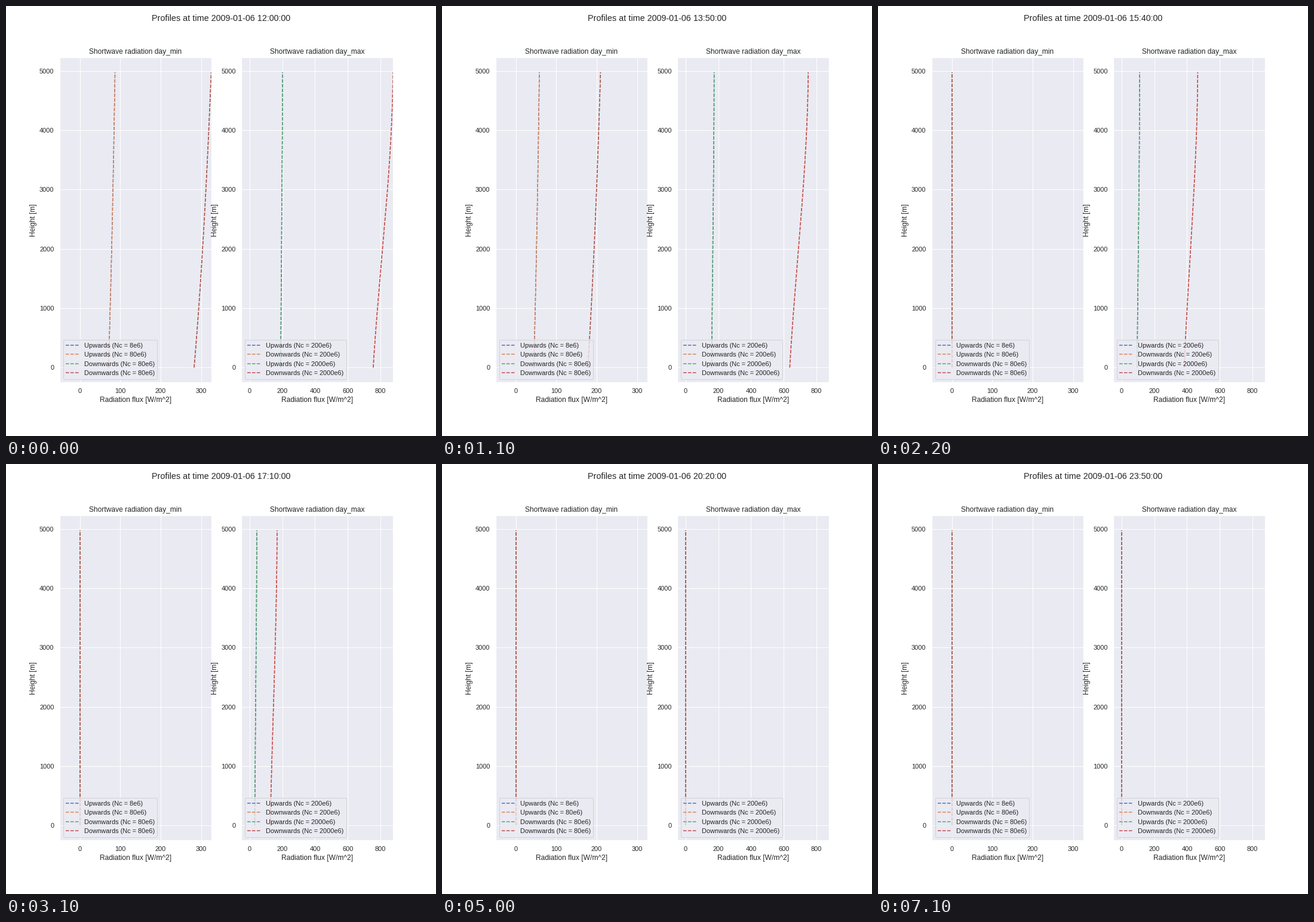
Recreate the animation shown at these times as a matplotlib script. Size 720 px wide and 720 px high, loop 7200 ms.

```python
import numpy as np
import matplotlib.pyplot as plt
from matplotlib.animation import FuncAnimation

FRAMES = 72
STEP_MS = 100
BLUE, ORANGE, GREEN, RED = "#4C72B0", "#DD8452", "#55A868", "#C44E52"

plt.rcParams.update({
    "font.family": "Liberation Sans", "font.size": 12,
    "text.color": ".15", "axes.labelcolor": ".15",
    "axes.facecolor": "#EAEAF2", "axes.edgecolor": "white",
    "axes.linewidth": 1.25, "axes.grid": True, "axes.axisbelow": True,
    "axes.labelsize": 12, "axes.titlesize": 12,
    "grid.color": "white", "grid.linewidth": 1,
    "xtick.color": ".15", "ytick.color": ".15",
    "xtick.labelsize": 11, "ytick.labelsize": 11,
    "xtick.major.size": 6, "ytick.major.size": 6,
    "xtick.bottom": False, "ytick.left": False,
    "lines.linewidth": 1.5, "patch.linewidth": 1,
    "legend.fontsize": 11, "figure.subplot.bottom": 0.125,
})

height = np.linspace(0, 4977, 200)
u = height / height[-1]

# Each flux row lists (surface, top) values at the matching cosines of the
# sun's hour angle; after the last row the flux fades by the given fractions.
PANELS = [
    dict(
        title="Shortwave radiation day_min", xmax=325, xticks=range(0, 301, 100),
        shape=u * (1.45 - 0.6 * u + 0.15 * u**2),
        cosines=[0.9963, 0.844, 0.738],
        up=[(70.5, 86.8), (44, 58), (26.2, 38)],
        down=[(282.7, 325), (178, 209.5), (107, 131)],
        fade=[(0.643, 0.46), (0.61, 0.29), (0.585, 0.15), (0.55, 0.04), (0.52, 0)],
        lines=[("up", "Upwards (Nc = 8e6)"), ("up", "Upwards (Nc = 80e6)"),
               ("down", "Downwards (Nc = 80e6)"), ("down", "Downwards (Nc = 80e6)")],
    ),
    dict(
        title="Shortwave radiation day_max", xmax=877, xticks=range(0, 801, 200),
        shape=u * (0.896 + 1.094 * u - 0.99 * u**2),
        cosines=[0.9963, 0.844, 0.738, 0.5015, 0.132],
        up=[(189.6, 201), (159, 174), (138.5, 154), (94.6, 110.3), (30.7, 43.5)],
        down=[(756, 877), (637, 750), (558.5, 661), (383, 466), (126, 168)],
        fade=[(0.03, 0.53), (-0.04, 0.2), (-0.1, 0.05), (-0.16, 0)],
        lines=[("up", "Upwards (Nc = 200e6)"), ("down", "Downwards (Nc = 200e6)"),
               ("up", "Upwards (Nc = 2000e6)"), ("down", "Downwards (Nc = 2000e6)")],
    ),
]


def profile(panel, kind, cosine):
    """Flux over height for one direction at the given sun position."""
    fade_cos, fade = zip(*panel["fade"])
    xs = np.array(panel["cosines"] + list(fade_cos))[::-1]
    ends = []
    for values in zip(*panel[kind]):
        ys = np.array(list(values) + [f * values[-1] for f in fade])[::-1]
        ends.append(np.interp(cosine, xs, ys))
    surface, top = ends
    return surface + (top - surface) * panel["shape"]


fig, axes = plt.subplots(1, 2, figsize=(10, 10), dpi=72, facecolor="white")
heading = fig.suptitle("", fontsize=14.4)
curves = []

for ax, panel in zip(axes, PANELS):
    for (kind, label), color in zip(panel["lines"], (BLUE, ORANGE, GREEN, RED)):
        line, = ax.plot(0 * height, height, "--", color=color, label=label)
        curves.append((line, panel, kind))
    ax.set(title=panel["title"], xlabel="Radiation flux [W/m^2]",
           ylabel="Height [m]", xlim=(-50, panel["xmax"]),
           ylim=(-0.05 * height[-1], 1.05 * height[-1]),
           xticks=panel["xticks"], yticks=range(0, 5001, 1000))
    ax.legend(loc="lower left")


def update(frame):
    minutes = 12 * 60 + 10 * frame
    heading.set_text(f"Profiles at time 2009-01-06 {minutes // 60:02d}:{minutes % 60:02d}:00")
    # Solar noon falls about 20 minutes before clock noon.
    cosine = np.cos(np.radians(15 * (frame / 6 + 0.33)))
    for line, panel, kind in curves:
        line.set_xdata(profile(panel, kind, cosine))
    return [heading] + [line for line, _, _ in curves]


anim = FuncAnimation(fig, update, frames=FRAMES, interval=STEP_MS,
                     init_func=lambda: update(0), repeat=True, blit=False)
plt.show()
```
